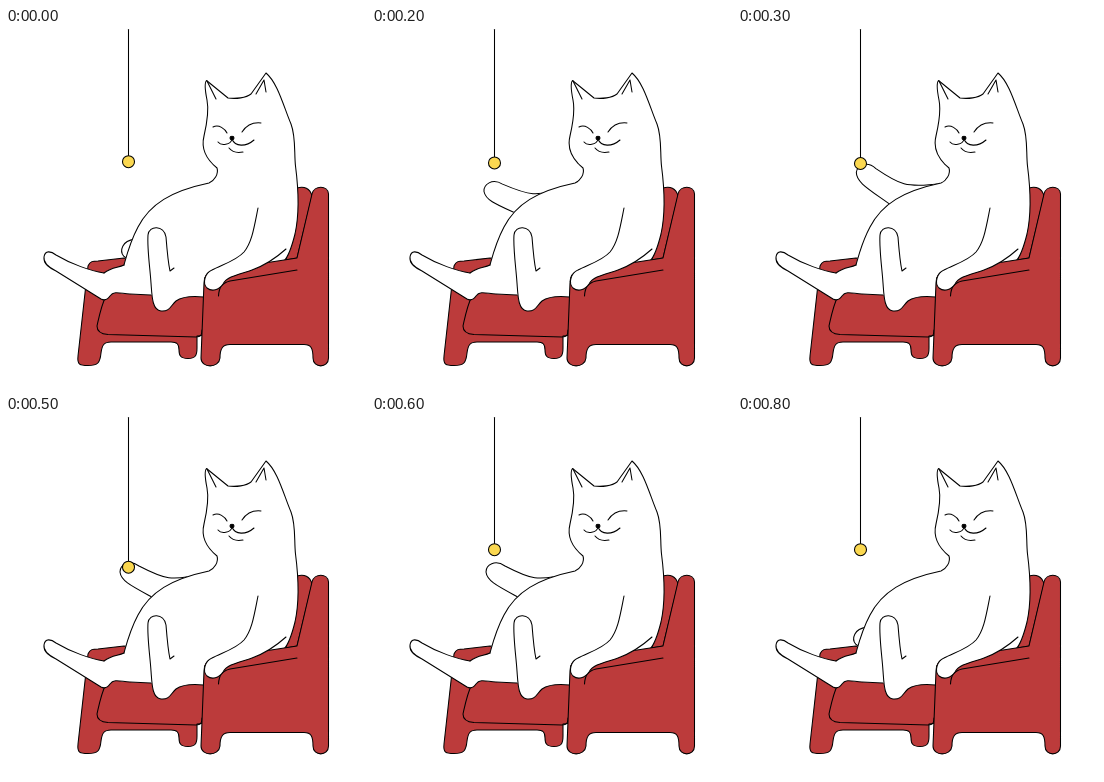
An HTML page for the animation above (0.9 s loop, 360 by 360 pixels).

```html
<!DOCTYPE html>
<html lang="en">
<head>
<meta charset="utf-8">
<title>Cat in an armchair</title>
<style>
  html, body { margin: 0; width: 100%; height: 100%; overflow: hidden; background: #fff; }
  svg { display: block; width: 100vw; height: 100vh; }
  .ink { stroke: #000; stroke-width: 1.05; stroke-linecap: round; stroke-linejoin: round; }
  .red { fill: #bc3b3b; }
  .white { fill: #fff; }
  .line { fill: none; }
  .bare { stroke: none; }
</style>
</head>
<body>
<svg viewBox="0 0 360 360">
  <g class="ink">
    <!-- far side of the chair, seat and back -->
    <g class="red">
      <path d="M82 238C84 233 87 233 92 233L118 230L200 240V302C200 307 195 308 191 308V320C191 328 189 330.500 182 330.500C175 330.500 173 328 173 322C173 316 171 314 165 314H105C98 314 96 317 95 325C94 335 92 337.500 82 337.500C74 337.500 71 337 72 328Z"/>
      <path class="line" d="M100 268C95 278 93 289 91 298C91 304 95 306 102 306.500L190 309C195 309 196 307 196 302"/>
      <path d="M291 160C298 158 304 160 306 168L291 230L280 232Z"/>
    </g>

    <path id="arm" class="white" d="M200 157C165 166 158 163 133 150C123 143 114 149 114 156C115 166 128 171 155 186"/>

    <!-- body and far leg -->
    <path class="white bare" d="M118 237C112 240 106 239 98 245L104 268C108 262 116 266 124 266L145 267L170 273C177 268 188 268 198 269L278 233L203 155C165 163 144 176 132 199C124 214 121 226 118 237Z"/>
    <path class="white" d="M118 237C121 226 124 214 132 199C144 176 165 163 203 155C208 153 213 146 211 140C200 131 195 120 198 108C201 95 203 82 201 72C199 62 198 55 200.500 52.500L222 70C230 71 240 70 245 66L260 45C272 55 278 80 285 96C290 109 288 125 289.500 138C293 165 293 188 289 206C286 218 283 228 278 233"/>
    <path class="white" d="M98 245C85 243 65 236 50 227C45 223 39 222 38 229C37 236 44 240 50 243L95 271C99 273 102 271 104 268C108 262 116 266 124 266L145 267"/>
    <path class="line" d="M98 245C106 239 112 240 118 237M201 53L210 71M250 66L258 52L260 64"/>

    <!-- near leg -->
    <path class="white" d="M168 240L164 243C162 234 161 222 160 209C158 197 143 197 142 207C141 220 144 240 145 255C146 268 146 282 155 283C164 284 165 277 170 273C177 268 188 268 198 269"/>

    <!-- face -->
    <path class="line" d="M207 99C213 96 219 101 221 105M236 104C240 98 246 94 255 95M212 114C215 118 225 117 226 111C229 119 240 119 248 112M223 120C227 125 232 125 237 124"/>
    <ellipse cx="226" cy="110" rx="2" ry="1.700"/>

    <!-- near side of the chair and resting arm -->
    <path class="red" d="M306 166C308 157 322 157 322.500 166V330C322.500 340.500 307 340.500 307 330C307 320 305 316.500 298 316.500H224C217 316.500 214 320 214 330C213 340.500 195 340.500 195 330L198 255C198 247 201 244 207 243L291 230Z"/>
    <path class="line" d="M212.500 268C213 259 216 255 224 253L291 242"/>
    <path class="white" d="M252 180C248 200 246 214 238 224C230 233 215 237 206 242C199 245 196 255 201 260C206 264 213 262 217 256C221 248 235 246 246 242C260 237 270 230 280 221"/>

    <!-- toy -->
    <path id="string" class="line"/>
    <circle id="ball" cx="122.5" r="6" fill="#fbd850"/>
  </g>
</svg>
<script>
const [arm, string, ball] = ["arm", "string", "ball"].map(id => document.getElementById(id));
const STEP = 100, STEPS = 9;
const TOP = 4;          // step at which the paw touches the ball
const HELD_UNTIL = 6;   // last step before the arm drops
const REST_ANGLE = -40, TOP_ANGLE = 10.6, FALL = 20;

function armAngle(step) {
  if (step > TOP) return -FALL * Math.max(0, step - HELD_UNTIL);
  const eased = Math.sin(step / TOP * Math.PI / 2);
  return REST_ANGLE + (TOP_ANGLE - REST_ANGLE) * eased;
}

// The ball sinks slightly, is pulled down once, then springs back.
function ballHeight(step) {
  const sag = step <= TOP ? 0.6 * step : 0;
  const pull = step === TOP + 1 ? 17.5 : 0;
  return 133.7 + sag + pull;
}

function tick() {
  const step = Math.floor(performance.now() / STEP) % STEPS;
  const y = ballHeight(step);
  arm.setAttribute("transform", `rotate(${armAngle(step)} 215 187)`);
  string.setAttribute("d", `M122.5 1.5V${y - 6}`);
  ball.setAttribute("cy", y);
  requestAnimationFrame(tick);
}
tick();
</script>
</body>
</html>
```
